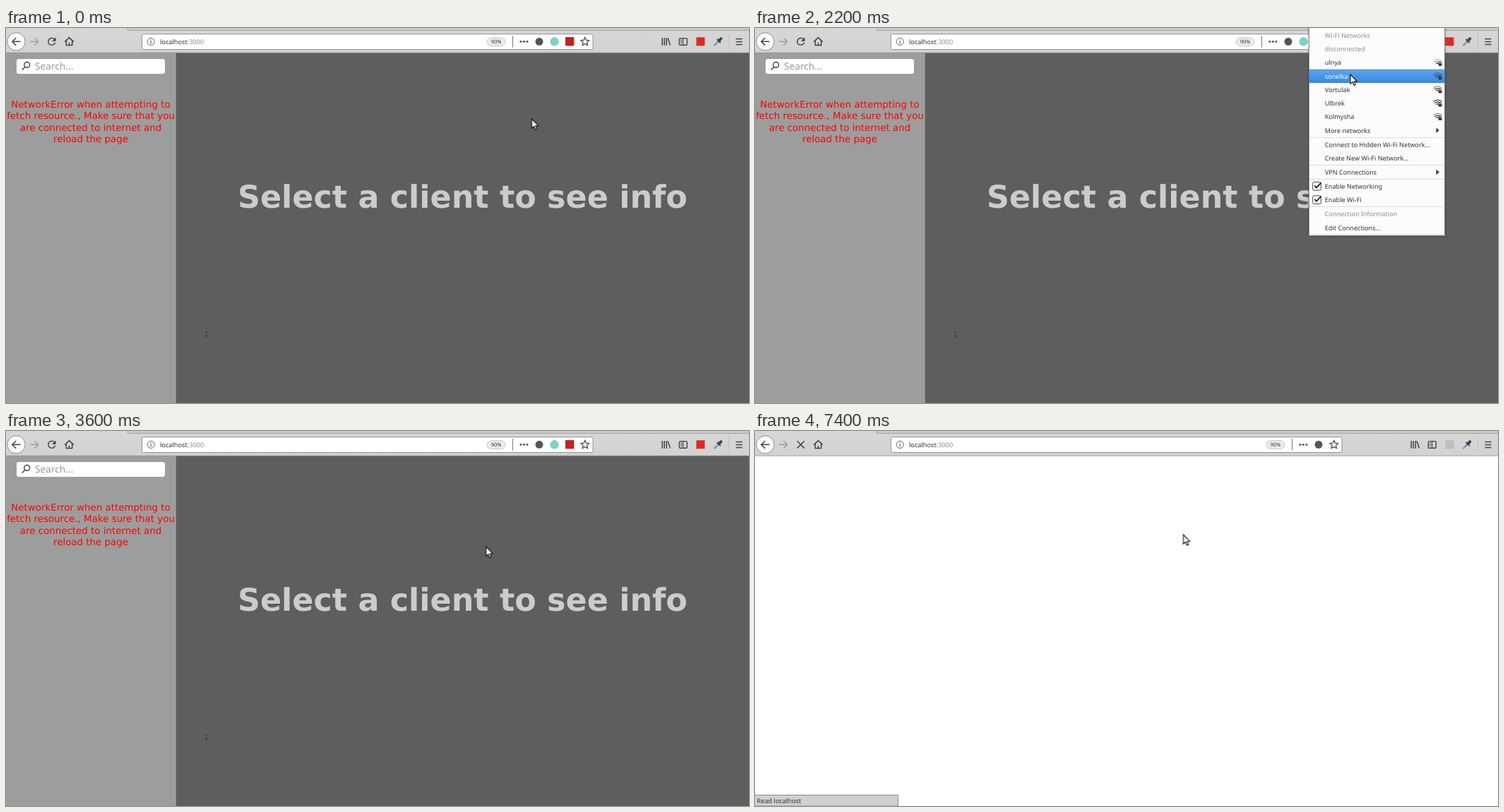
Animation, 1052 px wide and 532 px high, one loop 8000 ms. Source, as an HTML page:

```html
<!DOCTYPE html>
<html lang="en">
<head>
<meta charset="utf-8">
<title>Client list offline</title>
<style>
html, body { margin: 0; width: 100%; height: 100%; overflow: hidden; background: #fff; }
svg { display: block; width: 1052px; height: 532px; }
text { font-family: "Noto Sans", "Open Sans", sans-serif; font-size: 9.2px; fill: #333; white-space: pre; text-rendering: geometricPrecision; }
.dejavu { font-family: "DejaVu Sans", sans-serif; }
.title { font-size: 44.4px; font-weight: bold; fill: #ccc; }
.error { font-size: 13.4px; fill: #f00; text-anchor: middle; }
.hint { font-size: 13.7px; fill: #999; }
.menu text { font-size: 9.1px; }
.menu .dim, .dim { fill: #8e8e8e; }
.line { fill: none; stroke: #444; stroke-width: 1.5; }
.menu .on { fill: #fff; }

.page, .blank, .menu, .hot, .shift, #cursor { animation: 8s step-end infinite; }
.page { animation-name: page; }
.blank { animation-name: blank; }
.menu { animation-name: menu; }
.shift { animation-name: shift; }
#hot1 { animation-name: hot1; }
#hot2 { animation-name: hot2; }
#cursor { animation-name: point; }

@keyframes page { 0% { visibility: visible } 92.5%, 100% { visibility: hidden } }
@keyframes blank { 0% { visibility: hidden } 92.5%, 100% { visibility: visible } }
@keyframes menu { 0% { visibility: hidden } 22.5% { visibility: visible } 45%, 100% { visibility: hidden } }
@keyframes hot1 { 0% { visibility: hidden } 27.5% { visibility: visible } 28.75%, 100% { visibility: hidden } }
@keyframes hot2 { 0% { visibility: hidden } 28.75% { visibility: visible } 45%, 100% { visibility: hidden } }
@keyframes shift { 0% { transform: none } 92.5%, 100% { transform: translateX(43px) } }
@keyframes point {
  0% { transform: translate(744.5px, 129px) }
  1.25% { transform: translate(753px, 124px) }
  3.75% { transform: translate(764px, 112px) }
  5% { transform: translate(771px, 84px) }
  6.25% { transform: translate(727px, 38px) }
  7.5% { transform: translate(660px, 1px) }
  8.75% { transform: translate(660px, -40px) }
  26.25% { transform: translate(852px, 22px) }
  27.5% { transform: translate(843px, 66px) }
  28.75% { transform: translate(833.5px, 102px) }
  45% { transform: translate(679.8px, 164.3px) }
  82.5% { transform: translate(677.5px, 164.3px) }
  86.25% { transform: translate(668.5px, 161.3px) }
  92.5%, 100% { transform: translate(606.5px, 147px) }
}
</style>
</head>
<body>
<svg viewBox="0 0 1052 532">
  <defs>
    <linearGradient id="blue" x2="0" y2="1">
      <stop stop-color="#5aa6f0"/><stop offset="1" stop-color="#3a88e0"/>
    </linearGradient>
    <linearGradient id="bar" x2="0" y2="1">
      <stop stop-color="#d7d7d7"/><stop offset="1" stop-color="#d2d2d2"/>
    </linearGradient>
    <filter id="shadow" x="-5%" y="-5%" width="110%" height="110%">
      <feDropShadow dx="0" dy="0" stdDeviation="1.5" flood-opacity=".5"/>
    </filter>
  </defs>

  <rect width="1052" height="532" fill="#fff"/>

  <g class="page">
    <rect y="35" width="1052" height="497" fill="#5e5e5e"/>
    <rect y="35" width="240.8" height="497" fill="#9c9e9d"/>
    <rect x="15" y="44" width="210" height="21" rx="3" fill="#fff"/>
    <g class="line" style="stroke:#222;stroke-width:1.2">
      <circle cx="29.7" cy="52.3" r="3.9"/>
      <path d="M27 55.2 22.8 59.5"/>
    </g>
    <text class="hint" x="41" y="59.3">Search...</text>
    <text class="dejavu error" x="120" y="113">NetworkError when attempting to</text>
    <text class="dejavu error" x="120" y="129.3">fetch resource., Make sure that you</text>
    <text class="dejavu error" x="120" y="145.5">are connected to internet and</text>
    <text class="dejavu error" x="120" y="161.7">reload the page</text>
    <text class="dejavu title" x="328" y="255">Select a client to see info</text>
    <text class="dejavu" x="282" y="437" style="font-size:11px;fill:#000">;</text>
  </g>

  <g class="blank">
    <path d="M0 516.5H202.5V532H0" fill="#d0d0d0" stroke="#8a8a8a"/>
    <text x="2.5" y="528">Read localhost</text>
  </g>

  <!-- browser toolbar -->
  <rect width="1052" height="35" fill="url(#bar)"/>
  <rect x="172" width="880" height="3" fill="#cbcbcb"/>
  <path d="M172.5 0V3.3H1052" fill="none" stroke="#999" stroke-width=".9"/>
  <path d="M0 35.2H1052" stroke="#8f8f8f" stroke-width=".8"/>
  <circle cx="14.5" cy="19.3" r="12.6" fill="#fbfbfb" stroke="#8f8f8f"/>
  <path class="line" d="M20.5 19.3H9M14.2 14 8.9 19.3 14.2 24.6"/>
  <path class="line" style="stroke:#a0a0a0" d="M34 19.3H45.5M40.4 14 45.7 19.3 40.4 24.6"/>
  <g class="page">
    <path class="line" d="M68.6 16A5 5 0 1 0 69.6 20.8"/>
    <path d="M70.6 13.2V18.7H65.1Z" fill="#444"/>
  </g>
  <path class="line blank" d="M59.7 14.2 69.9 24.4M69.9 14.2 59.7 24.4"/>
  <path class="line" d="M83.2 19.6 89.5 13.6 95.8 19.6M85.3 18.5V24.6H93.7V18.5M89.5 24.6V20.7"/>

  <rect x="192.5" y="8.6" width="638.5" height="21.9" rx="2" fill="#fff" stroke="#929292"/>
  <circle class="line" cx="205.2" cy="19.3" r="5.1" style="stroke:#666;stroke-width:1"/>
  <path d="M205.2 16.2V17.4M205.2 18.5V22.3" stroke="#555" stroke-width="1.2"/>
  <text x="218" y="22.7">localhost<tspan class="dim">:3000</tspan></text>
  <g class="shift">
    <rect x="681" y="13.7" width="26" height="11.6" rx="5.8" fill="#ececec" stroke="#bbb" stroke-width=".8"/>
    <text x="694" y="22.2" text-anchor="middle" style="font-size:7.4px">90%</text>
    <path d="M717.5 11V27.5" stroke="#777"/>
    <g fill="#555">
      <circle cx="728.9" cy="19.3" r="1.5"/><circle cx="733.4" cy="19.3" r="1.5"/><circle cx="737.9" cy="19.3" r="1.5"/>
      <circle cx="755" cy="19.3" r="5.5"/>
    </g>
  </g>
  <g class="page">
    <circle cx="776.5" cy="19.3" r="6.2" fill="#7fd0c8"/>
    <rect x="792" y="13" width="12.3" height="12.3" fill="#c8201e"/>
  </g>
  <path class="line" style="stroke-width:1.2" d="M819.8 13.3 821.5 17.2 825.7 17.6 822.5 20.4 823.5 24.6 819.8 22.4 816.1 24.6 817.1 20.4 813.9 17.6 818.1 17.2Z"/>

  <path class="line" d="M929.2 14V24.8M932.2 14V24.8M935.2 14V24.8M937 14.2 940.5 24.6"/>
  <rect class="line" x="953.3" y="14.6" width="11" height="9.6" rx="1.5" style="stroke-width:1.4"/>
  <path class="line" style="stroke-width:1.1" d="M958.6 14.6V24.2M955 17H957.2M955 19H957.2M955 21H957.2"/>
  <rect class="page" x="977.4" y="13.2" width="12" height="12" fill="#dd2a22"/>
  <rect class="blank" x="977.4" y="13.2" width="12" height="12" fill="#bdbdbd"/>
  <path d="M1003.2 24.4 1009 18.6" stroke="#6b9fc4" stroke-width="2.6" stroke-linecap="round"/>
  <path d="M1006.5 15.8 1011.8 21.1" stroke="#444" stroke-width="1.8"/>
  <path d="M1009.5 18 1012.3 15.2" stroke="#444" stroke-width="4" stroke-linecap="round"/>
  <path d="M1023.5 8V31" stroke="#c2c2c2"/>
  <path class="line" style="stroke-width:1.4" d="M1033.5 15.5H1042.5M1033.5 19.5H1042.5M1033.5 23.5H1042.5"/>

  <g class="menu">
    <rect x="784" y="-4" width="193" height="299" fill="#fcfcfc" filter="url(#shadow)"/>
    <path d="M784.5 0V294.5H976.5V0" fill="none" stroke="#777" stroke-width=".8"/>
    <path d="M785 155.5H976M785 194.5H976M785 214.5H976M785 253.5H976M785 293H976" stroke="#d9d9d9" stroke-width=".9"/>
    <g id="rows"></g>
  </g>

  <path id="cursor" d="M0 0V13.2L3 10.5 5.1 15.3 7.3 14.3 5.2 9.7H9.2Z" fill="#fff" stroke="#111" stroke-width="1.1"/>
</svg>
<script>
const rows = document.getElementById('rows');
const add = html => rows.insertAdjacentHTML('beforeend', html);
const label = (y, text, cls = '') => add(`<text class="${cls}" x="806.8" y="${y + 3.4}">${text}</text>`);
const hot = (id, y, text) => {
  add(`<g class="hot" id="${id}"><rect x="784.5" y="${y - 9.2}" width="192" height="18.5" fill="url(#blue)" stroke="#3a7fcb" stroke-width=".8"/>
    <text class="on" x="806.8" y="${y + 3.4}">${text}</text></g>`);
};
const arc = (r, alpha) => {
  const d = r * 0.72;
  return `<path d="M${-d} ${-d}A${r} ${r} 0 0 1 ${d} ${-d}" stroke-opacity="${alpha}"/>`;
};
const wifi = (y, strength) => add(`<g transform="translate(966.5 ${y + 4.2})">
  <g fill="none" stroke="#333" stroke-width="1.1">${arc(8.6, strength)}${arc(5.9, strength < .4 ? .5 : 1)}${arc(3.2, 1)}</g>
  <rect x="1.2" y="-3" width="4.8" height="3.6" fill="#333"/>
  <path d="M2.2 -3V-4.2A1.4 1.4 0 0 1 5 -4.2V-3" fill="none" stroke="#333" stroke-width=".9"/></g>`);
const arrow = y => add(`<path d="M964.5 ${y - 3.7}L968.8 ${y}L964.5 ${y + 3.7}Z" fill="#333"/>`);
const check = y => add(`<rect x="789.7" y="${y - 6}" width="11.6" height="11.6" rx="1.8" fill="#fff" stroke="#444"/>
  <path d="M792.3 ${y - 1}L795 ${y + 2}L801.5 ${y - 5.3}" fill="none" stroke="#222" stroke-width="1.8"/>`);

const nets = [['ulnya', 49, .3], ['sonelka', 68.3, .6], ['Vortulak', 87.5, .6], ['Ulbrek', 106.7, 1], ['Kolmysha', 126, .6]];

label(10.3, 'Wi-Fi Networks', 'dim');
label(29.6, 'disconnected', 'dim');
nets.forEach(([name, y]) => label(y, name));
label(145.3, 'More networks');
label(165.3, 'Connect to Hidden Wi-Fi Network...');
label(184.5, 'Create New Wi-Fi Network...');
label(204.5, 'VPN Connections');
label(224.6, 'Enable Networking');
label(243.9, 'Enable Wi-Fi');
label(264, 'Connection Information', 'dim');
label(283.3, 'Edit Connections...');
hot('hot1', nets[1][1], nets[1][0]);
hot('hot2', nets[3][1], nets[3][0]);
nets.forEach(([, y, strength]) => wifi(y, strength));
[145.3, 204.5].forEach(arrow);
[224.6, 243.9].forEach(check);
</script>
</body>
</html>
```
